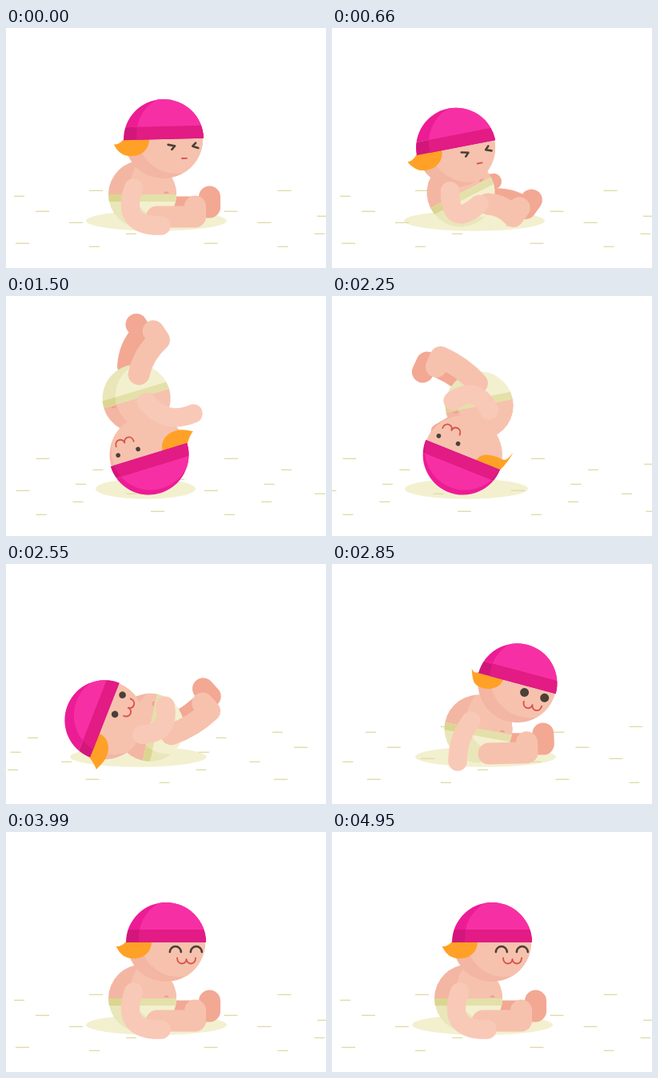
Write an HTML page with a canvas that moves like this. It is 400x300 px and loops after 4980 ms.

```html
<!DOCTYPE html>
<html lang="en">
<head>
<meta charset="utf-8">
<title>Rolling baby</title>
<style>
  html, body { margin: 0; width: 100%; height: 100%; overflow: hidden; background: #fff; }
  canvas { display: block; }
</style>
</head>
<body>
<canvas id="stage" width="400" height="300"></canvas>
<script>
const LOOP = 4980, PERIOD = 235.5, RAD = Math.PI / 180, TAU = Math.PI * 2;
const ctx = document.getElementById('stage').getContext('2d');

const SKIN = '#f6c2ae', SKIN_SHADE = '#f3b6a3', SKIN_FAR = '#f2a893', SKIN_ARM = '#f9c9b7';
const INK = '#4a4038', LIP = '#d9544a', CLOTH = '#f3f0d0';

// body, head: x, y, angle on stage; shadow: x, half width; curl: height of the hair tip
// leg: hip x, thigh angle, length, bend, ankle; arm: hand x, y, bend; far: other hand x, y
const sit = {
  body: [170.5, 208, 360], head: [200, 138, 360], leg: [18, 0, 48, 0, -90],
  arm: [23.5, 39, 42], far: [14, -3], curl: [5], shadow: [188, 88], scroll: [PERIOD]
};
const start = { ...sit, body: [170.5, 208, 0], head: [197, 139, -1.3], scroll: [0] };
const lean = {
  body: [161, 206, -27], head: [155, 149.7, -10.9], leg: [24, 53, 35, -7, -80],
  arm: [14, 23, 44], far: [43, 6], curl: [6], shadow: [178, 88], scroll: [0]
};
const bow = {
  ...lean, body: [166, 175, 75], head: [222, 197, 95],
  arm: [50, -10, 10], far: [14, -3], shadow: [192, 80], scroll: [33]
};
const stand = {
  body: [163, 128, 163.4], head: [178.5, 198.5, 163], leg: [-11.6, 137, 50, -8, -64],
  arm: [-62.6, -38.5, 22.5], far: [14, -3], curl: [12], shadow: [174.5, 62.5], scroll: [66.5]
};
const tuck = {
  body: [184, 137, 168.5], head: [163.7, 198.5, 201.7], leg: [-3, 47, 56, 6, -101],
  arm: [31, 12.5, 27], far: [56, -22], curl: [26], shadow: [168, 77], scroll: [90.5]
};
const supine = {
  ...tuck, body: [180, 204, 275], head: [122, 196, 285],
  far: [14, -3], curl: [14], shadow: [165, 85], scroll: [144]
};
const crawl = {
  body: [183, 206, 370.6], head: [231.4, 149.3, 375], leg: [18.5, -12, 48, 0, -91],
  arm: [-18, 45, 9], far: [14, -3], curl: [-4], shadow: [192, 88], scroll: [203.5]
};
const KEYS = [
  [0, start], [660, lean], [850, lean], [1180, bow], [1450, stand], [2000, stand],
  [2250, tuck], [2530, supine], [2850, crawl], [3150, sit], [LOOP, sit]
];

// Values of one part at a time, on a smooth monotone curve through the poses.
function at(part, t) {
  const time = k => KEYS[k][0], value = (k, c) => KEYS[k][1][part][c];
  const secant = (k, c) => (value(k + 1, c) - value(k, c)) / (time(k + 1) - time(k));
  const slope = (k, c) => {
    if (k === 0 || k === KEYS.length - 1) return 0;
    const p = secant(k - 1, c), q = secant(k, c);
    return p * q <= 0 ? 0 : 2 * p * q / (p + q);
  };
  let i = 0;
  while (i < KEYS.length - 2 && time(i + 1) <= t) i++;
  const span = time(i + 1) - time(i), u = (t - time(i)) / span, w = 1 - u;
  return KEYS[i][1][part].map((v, c) =>
    v * w * w * (1 + 2 * u) + value(i + 1, c) * u * u * (3 - 2 * u)
    + span * u * w * (w * slope(i, c) - u * slope(i + 1, c)));
}

function place([x, y, angle], draw) {
  ctx.save();
  ctx.translate(x, y);
  ctx.rotate(angle * RAD);
  draw();
  ctx.restore();
}

function disc(x, y, r) {
  ctx.beginPath();
  ctx.arc(x, y, r, 0, TAU);
}

function stroke(color, width, trace) {
  ctx.strokeStyle = color;
  ctx.lineWidth = width;
  ctx.beginPath();
  trace();
  ctx.stroke();
}

function line(...p) {
  ctx.moveTo(p[0], p[1]);
  for (let i = 2; i < p.length; i += 2) ctx.lineTo(p[i], p[i + 1]);
}

// A ball cut in bands [top, bottom, shade, light]; ox, oy shift the light as seen on stage.
function ball(r, angle, ox, oy, bands) {
  const c = Math.cos(angle * RAD), s = Math.sin(angle * RAD);
  const paint = tone => bands.forEach(band => {
    ctx.fillStyle = band[tone];
    ctx.fillRect(-r - 1, band[0], 2 * r + 2, band[1] - band[0]);
  });
  ctx.save();
  disc(0, 0, r);
  ctx.clip();
  paint(2);
  disc(ox * c + oy * s, oy * c - ox * s, r);
  ctx.clip();
  paint(3);
  ctx.restore();
}

// A curve that bows sideways by the bend, then runs on to the extra points.
function limb(color, width, x0, y0, x1, y1, bend, ...rest) {
  const dx = x1 - x0, dy = y1 - y0, d = Math.hypot(dx, dy);
  stroke(color, width, () => {
    ctx.moveTo(x0, y0);
    ctx.quadraticCurveTo((x0 + x1) / 2 - dy / d * bend, (y0 + y1) / 2 + dx / d * bend, x1, y1);
    if (rest.length) ctx.lineTo(...rest);
  });
}

function leg(color, [hip, thigh, length, bend, ankle], dx, dy, reach) {
  const x = hip + dx, y = 28 + dy, foot = (thigh + ankle) * RAD;
  const heelX = x + length * Math.cos(thigh * RAD), heelY = y + length * Math.sin(thigh * RAD);
  limb(color, 27, x - reach, y, heelX, heelY, bend,
    heelX + 13 * Math.cos(foot), heelY + 13 * Math.sin(foot));
}

function face(t, angle) {
  const drop = 1 - Math.cos(angle * RAD);
  ctx.translate(-drop / 2, drop * 1.1);
  if (t < 1100) {
    stroke(INK, 2.6, () => {
      line(5.5, 7, 14, 8.8, 10, 13);
      line(40, 5.5, 36, 9.5, 43, 12);
    });
    stroke(LIP, 1.9, () => line(22.5, 24.5, 28.5, 24.5));
    return;
  }
  for (const x of [11.8, 37.8]) {
    if (t < 3240) {
      ctx.fillStyle = INK;
      disc(x, 8.5, t < 2250 ? 2.8 : Math.min(5.5, 2.8 + (t - 2250) / 200));
      ctx.fill();
    } else {
      stroke(INK, 2.6, () => ctx.arc(x, 12, 7, Math.PI, TAU));
    }
  }
  stroke(LIP, 1.9, () => {
    ctx.moveTo(14, 19.5);
    ctx.bezierCurveTo(14, 28.5, 25, 28.5, 25.5, 21);
    ctx.bezierCurveTo(26, 28.5, 37, 28.5, 37, 19.5);
  });
}

function hair(tipY) {
  const swing = Math.abs(tipY - 7), tipX = -63 + swing * 0.3, low = 21 - swing * 0.4;
  ctx.fillStyle = '#ffa126';
  ctx.beginPath();
  ctx.moveTo(-50, -1);
  ctx.quadraticCurveTo(-56, 4 + tipY * 0.35, tipX, tipY);
  ctx.bezierCurveTo(tipX + 5, low * 0.75, -51, low, -40, low);
  ctx.bezierCurveTo(-28, low, -18, low * 0.6, -18, -1);
  ctx.fill();
}

// The first four dashes are long, the others short.
const DASHES = [
  [104, 203], [37, 229], [79, 243], [12, 269],
  [10, 210], [175, 217], [153.5, 235], [217, 247], [150, 257], [104, 273]
];

function ground(t) {
  const [x, rx] = at('shadow', t), [scroll] = at('scroll', t);
  ctx.fillStyle = CLOTH;
  ctx.beginPath();
  ctx.ellipse(x, 241, rx, 12.7, 0, 0, TAU);
  ctx.fill();
  ctx.fillStyle = '#e1dda9';
  DASHES.forEach(([dx, y], i) => {
    for (let k = -1; k < 3; k++) ctx.fillRect(dx + k * PERIOD - scroll, y - 0.4, i < 4 ? 17 : 13, 1.4);
  });
}

function draw(t) {
  ctx.fillStyle = '#fff';
  ctx.fillRect(0, 0, 400, 300);
  ctx.lineCap = ctx.lineJoin = 'round';
  ground(t);

  const body = at('body', t), head = at('head', t), legs = at('leg', t);
  const [handX, handY, armBend] = at('arm', t);
  const hop = (t - 3150) / 600;
  if (hop > 0 && hop < 1) head[1] -= 9 * Math.sin(hop * Math.PI);
  const bodyUp = Math.cos(body[2] * RAD), headUp = Math.cos(head[2] * RAD);
  const headBall = (r, bands) => ball(r, head[2], 9 + 7 * headUp, -6, bands);

  place(body, () => {
    leg(SKIN_FAR, legs, 18, legs[1] * 0.19 - 12, 8);
    stroke(SKIN_FAR, 20, () => line(5, -5, ...at('far', t)));
    ball(42.5, body[2], 22 + 6 * bodyUp, -8 - 5 * bodyUp, [
      [-43, 0, SKIN_SHADE, SKIN],
      [0, 43, '#e9e6ba', CLOTH],
      [0, 9, '#dad68f', '#e4e0a9']
    ]);
    limb('#eb9f8b', 1.8, 28, -2, 32, -2, -1.6);
  });

  place(head, () => {
    headBall(49, [[-50, 50, SKIN_SHADE, SKIN]]);
    hair(at('curl', t)[0]);
    headBall(50, [
      [-51, -16, '#ec1c94', '#f72fa5'],
      [-16, 0, '#d3167b', '#e21b85']
    ]);
    face(t, head[2]);
  });

  place(body, () => {
    leg(SKIN, legs, 0, 0, 0);
    limb(SKIN_ARM, 23.5, -11, -8, handX, handY, armBend);
  });
}

function tick() {
  draw(performance.now() % LOOP);
  requestAnimationFrame(tick);
}
tick();
</script>
</body>
</html>
```
